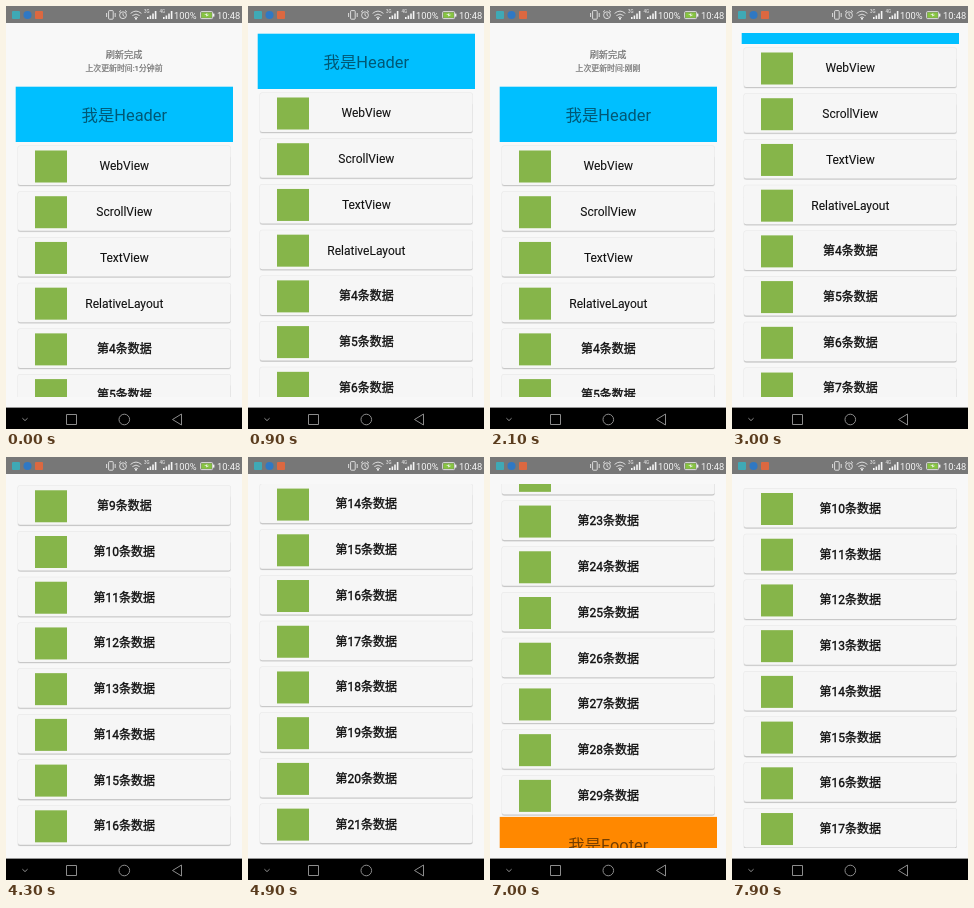
Recreate the animation shown at these times as an HTML page. Size 236 px wide and 423 px high, loop 8000 ms.

```html
<!DOCTYPE html>
<html lang="zh">
<head>
<meta charset="utf-8">
<title>Pull to refresh list</title>
<style>
html, body { margin: 0; width: 236px; height: 423px; overflow: hidden; background: #f8f8f8; }
svg { display: block; font-family: Roboto, "Noto Sans CJK SC", "Noto Sans CJK", sans-serif; }
.mid { text-anchor: middle; }
.row text { font-size: 12px; fill: #101010; stroke: #101010; stroke-width: .1px; }
.row .cjk { stroke-width: .35px; }
.band { font-size: 16.4px; fill: rgba(0, 0, 0, .54); }
.hint, .time { fill: #707070; stroke: #707070; stroke-width: .2px; }
.hint { font-size: 9.2px; }
.time { font-size: 7.87px; }
.status { fill: #f4f4f4; font-size: 9.3px; }
.line { fill: none; stroke: #e8e8e8; stroke-width: .9; }
.nav { fill: none; stroke: #8c8c8c; }

#list, #spin, .release, .busy, .done, .before, .after { animation: 8s step-end infinite; }
#list { animation-name: scroll; }
#spin { animation-name: spin; transform-origin: 60px 55px; }
.release { animation-name: release; }
.busy { animation-name: busy; }
.done { animation-name: done; }
.before { animation-name: before; }
.after { animation-name: after; }

@keyframes scroll {
  0% { transform: translateY(53px); }
  3.75% { transform: translateY(20px); }
  5% { transform: none; }
  15% { transform: translateY(74px); }
  18.75% { transform: translateY(53px); }
  31.25% { transform: none; }
  37.5% { transform: translateY(-45px); }
  41.25% { transform: translateY(-469.7px); }
  60% { transform: translateY(-545px); }
  61.25% { transform: translateY(-700px); }
  63.75% { transform: translateY(-940px); }
  67.5% { transform: translateY(-1120.6px); }
  80% { transform: translateY(-1116px); }
  82.5% { transform: translateY(-1107px); }
  87.5% { transform: translateY(-1094.5px); }
  91.25% { transform: translateY(-900px); }
  95% { transform: translateY(-690px); }
  98.75%, 100% { transform: translateY(-512.7px); }
}
@keyframes spin {
  0% { transform: none; }
  22.5%, 100% { transform: rotate(135deg); }
}
@keyframes release {
  0%, 18.75%, 100% { visibility: hidden; }
  15% { visibility: visible; }
}
@keyframes busy {
  0%, 26.25%, 100% { visibility: hidden; }
  18.75% { visibility: visible; }
}
@keyframes done {
  0%, 26.25%, 100% { visibility: visible; }
  15% { visibility: hidden; }
}
@keyframes before {
  0% { visibility: visible; }
  26.25%, 100% { visibility: hidden; }
}
@keyframes after {
  0% { visibility: hidden; }
  26.25%, 100% { visibility: visible; }
}
</style>
</head>
<body>
<svg width="236" height="423" viewBox="0 0 236 423">
  <defs>
    <clipPath id="view"><rect x="0" y="27" width="236" height="364"/></clipPath>
    <g id="bars"><path d="M0 13v-2h1.6v2zM2.6 13v-3.6h1.6v3.6zM5.2 13v-5.4h1.6v5.4zM7.8 13v-8h1.6v8z"/></g>
  </defs>
  <rect width="236" height="423" fill="#f8f8f8"/>

  <g clip-path="url(#view)">
    <g id="list">
      <g class="mid" transform="translate(0 -53)">
        <g class="hint">
          <text class="release" x="118" y="51.6">释放立即刷新</text>
          <text class="busy" x="118" y="51.6">正在刷新...</text>
          <text class="done" x="118" y="51.6">刷新完成</text>
        </g>
        <g class="time">
          <text class="before" x="118" y="65">上次更新时间:1分钟前</text>
          <text class="after" x="118" y="65">上次更新时间:刚刚</text>
        </g>
        <path class="release" d="M60 47l5 6h-3v10h-4v-10h-3z" fill="#b5b5b5"/>
        <g class="busy"><g id="spin" fill="#b5b5b5"></g></g>
      </g>
      <g id="rows"></g>
      <rect x="9.7" y="27.7" width="217.3" height="55.3" fill="#00bfff"/>
      <text class="band mid" x="118.3" y="62">我是Header</text>
      <rect x="9.7" y="1454.4" width="217.3" height="55.3" fill="#ff8800"/>
      <text class="band mid" x="118.3" y="1488.8">我是Footer</text>
    </g>
  </g>

  <rect width="236" height="17" fill="#777"/>
  <rect x="6" y="5" width="8" height="8" rx="1" fill="#3fa9b5"/>
  <circle cx="21.5" cy="9" r="4" fill="#2f78c4"/>
  <rect x="29" y="5" width="8" height="8" rx="1" fill="#dc6840"/>
  <g class="line">
    <rect x="102.6" y="4.6" width="4.6" height="8.6" rx=".8"/>
    <path d="M100.6 7v4M109.2 7v4"/>
    <circle cx="117" cy="9.2" r="3.4"/>
    <path d="M117 7.2v2.2l1.4 1M113 6.2l2-1.8M121 6.2l-2-1.8"/>
    <path d="M124.6 7.4q5.4-4.6 10.8 0M126.4 9.6q3.6-3 7.2 0M128.2 11.6q1.8-1.4 3.6 0"/>
    <rect x="194.6" y="5.6" width="12" height="7" rx="1"/>
  </g>
  <g class="status">
    <circle cx="130" cy="12.8" r="1"/>
    <use href="#bars" x="141"/>
    <use href="#bars" x="157"/>
    <text x="138" y="7.4" font-size="4.5">3G</text>
    <text x="153.6" y="7.4" font-size="4.5">4G</text>
    <text x="168" y="12.6">100%</text>
    <rect x="207" y="7.6" width="1.4" height="3"/>
    <rect x="195.4" y="6.4" width="10.4" height="5.4" fill="#86c440"/>
    <path d="M198 8.8l3.4-1.6-.4 1.6h2.4l-3.4 1.8.4-1.8z"/>
    <text x="211" y="12.6">10:48</text>
  </g>

  <rect y="401.6" width="236" height="22" fill="#000"/>
  <path class="nav" d="M16.4 412.2l2.6 2.4 2.6-2.4M60.5 408.5h10v10h-10zM175.5 408v11l-9-5.5z"/>
  <circle class="nav" cx="118.3" cy="413.5" r="5.3"/>
</svg>
<script>
const names = ['WebView', 'ScrollView', 'TextView', 'RelativeLayout'];

function row(i) {
  const y = 106.5 + 45.72 * i;
  const label = names[i] || `第${i}条数据`;
  return `<g class="row" transform="translate(0 ${y.toFixed(2)})">
    <rect x="11.5" y="-20" width="213.5" height="41" rx="2.5" fill="#e6e6e6"/>
    <rect x="12" y="-10" width="212.5" height="30.6" rx="2.5" fill="#c8c8c8"/>
    <rect x="12" y="-19.5" width="212.5" height="39" rx="2" fill="#f6f6f6"/>
    <rect x="29" y="-15" width="32" height="32" fill="#86b54a"/>
    <text class="mid${i < names.length ? '' : ' cjk'}" x="118.3" y="4.9">${label}</text>
  </g>`;
}

function dot(i) {
  const a = i * Math.PI / 4;
  const x = 60 + 7.5 * Math.cos(a), y = 55 + 7.5 * Math.sin(a);
  return `<circle cx="${x}" cy="${y}" r="${1 + i * .12}" opacity="${.3 + i * .1}"/>`;
}

const fill = (id, count, part) => {
  document.getElementById(id).innerHTML = Array.from({ length: count }, (_, i) => part(i)).join('');
};
fill('rows', 30, row);
fill('spin', 8, dot);
</script>
</body>
</html>
```
